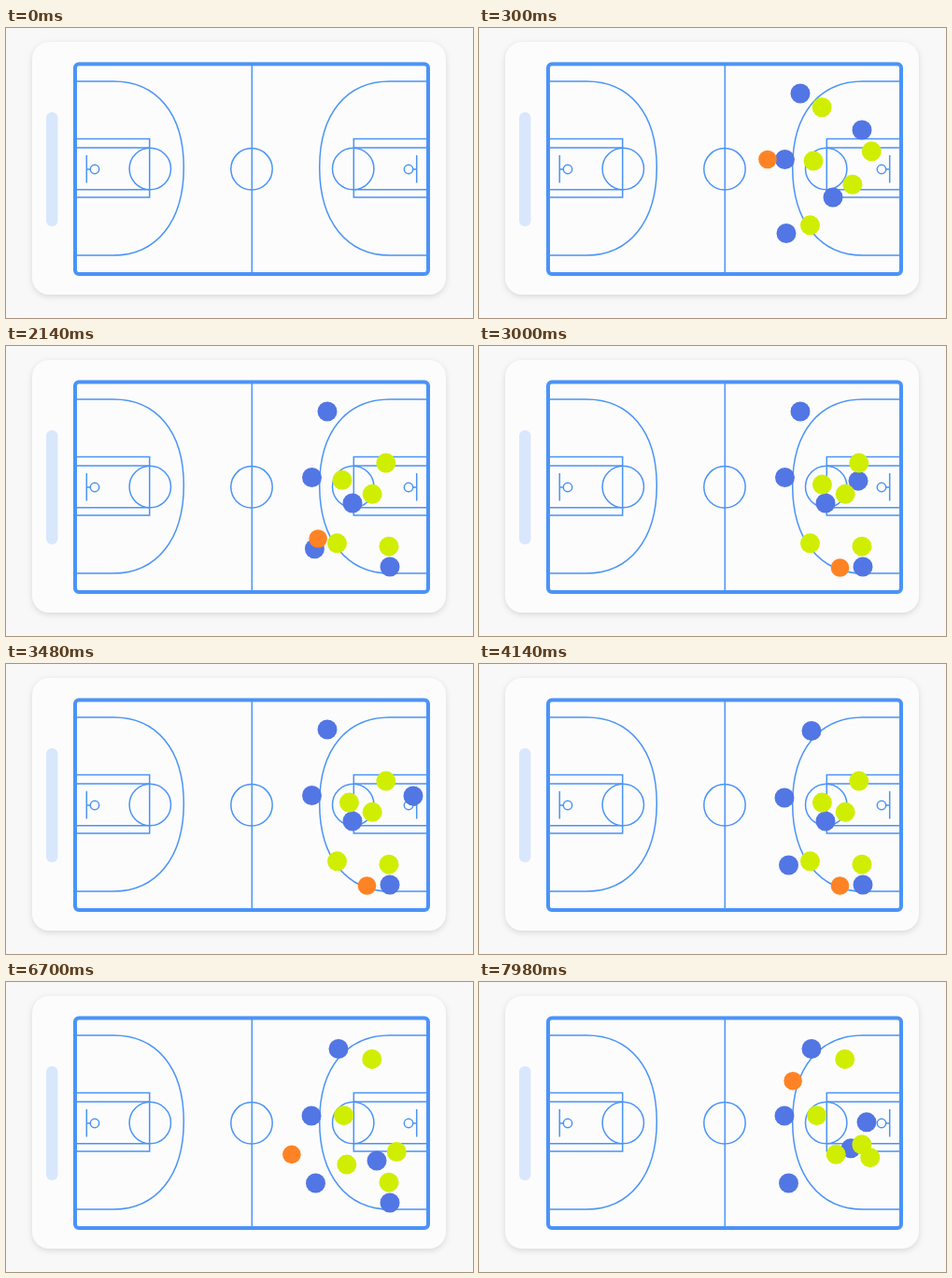
Animation, 500 px wide and 310 px high, one loop 8000 ms. Source, as an HTML page:

```html
<!DOCTYPE html>
<html lang="en">
<head>
<meta charset="utf-8">
<title>Basketball play</title>
<style>
  html, body { margin: 0; width: 100%; height: 100%; overflow: hidden; background: #f8f8f8; }
  svg { display: block; width: 500px; height: 310px; }
  .card { fill: #fcfcfc; filter: drop-shadow(0 2px 3px rgba(0, 0, 0, .13)); }
  .lines { fill: none; stroke: #4a93f8; stroke-width: 1.5; }
</style>
</head>
<body>
<svg viewBox="0 0 500 310">
  <defs>
    <g id="half">
      <path d="M76 57H115C161 57 190.300 91 190.300 149S161 243 115 243H76"/>
      <path d="M76 118.500H153.700V181H76M76 128H153.700M76 172.700H153.700"/>
      <circle cx="154.300" cy="150.500" r="22.200"/>
      <path d="M86.300 136V165.500M86.300 151H90.300"/>
      <circle cx="95" cy="151" r="4.700"/>
    </g>
  </defs>
  <rect width="500" height="310" fill="#f8f8f8"/>
  <rect class="card" x="28" y="15" width="443" height="270" rx="18"/>
  <rect x="43" y="90" width="12.500" height="122" rx="6" fill="#d9e7fd"/>
  <g class="lines">
    <use href="#half"/>
    <use href="#half" transform="translate(526) scale(-1 1)"/>
    <path d="M263.300 39V263"/>
    <circle cx="263" cy="150.800" r="22.200"/>
    <rect x="74" y="38.500" width="378" height="224.500" rx="4" stroke-width="4"/>
  </g>
  <g id="pieces"></g>
</svg>
<script>
const LOOP = 8000;
const FADE_IN = 300;
const HOOP = [431, 151];

// Spots on the court that the attackers run between
const top1 = [344, 70], top2 = [356, 71.5];
const mid1 = [327.5, 140.5], mid2 = [327, 143];
const low1 = [329, 219.5], low2 = [331.5, 215];
const block = [410, 109], corner = [411, 236], baseline = [416.5, 118];
const elbow = [379, 181], post = [371, 168], screen = [397, 191], seal = [398.5, 173];
const rim = [436, 141], lane = [372, 137];

// A defender stands between an attacker's spot and the hoop, optionally shaded sideways
function guard([x, y], gap, side = 0) {
  const dx = HOOP[0] - x, dy = HOOP[1] - y, length = Math.hypot(dx, dy);
  return [x + (dx * gap - dy * side) / length, y + (dy * gap + dx * side) / length];
}

const lineup = {
  attack: { color: '#5276e4', radius: 10.5, start: {
    top: top1, middle: mid1, cutter: low1, runner: block, big: elbow } },
  defence: { color: '#d0ee02', radius: 10.5, start: {
    onTop: guard(top1, 27, -5), onMiddle: guard(mid1, 30.5, -1.5), onRunner: guard(block, 25, 1),
    onBig: guard(elbow, 25, -1.5), onLow: guard(low1, 26, 7) } },
  ball: { color: '#ff8324', radius: 9.8, start: { ball: [309, 140.5] } }
};

// A target is a point, optionally with a bend and its own end time
const beats = [
  { from: 600, to: 820, move: { ball: [320.5, 198] } },
  { from: 1280, to: 1600, move: {
    runner: corner, big: post,
    onTop: guard(top1, 83.5, -2.5), onRunner: guard(corner, 21, -6), onBig: guard(post, 23, -3.5) } },
  { from: 2020, to: 2420, move: { ball: [386.5, 237], onMiddle: guard(mid1, 40.5, 3.5) } },
  { from: 2020, to: 3480, bend: lane, move: { cutter: rim } },
  { from: 3820, to: 4140, move: { cutter: top2, top: mid2, middle: low2 } },
  { from: 4640, to: 5040, move: {
    ball: [307.5, 220.5], onTop: guard(top2, 34.5), onMiddle: guard(mid2, 21.5, 2) } },
  { from: 5540, to: 6000, move: {
    big: screen, onTop: guard(top2, 32.5, -18.5), onMiddle: guard(mid2, 34.5, -3),
    onBig: guard(screen, 21, 10) } },
  { from: 6480, to: 6940, move: { ball: [304, 143], onLow: guard(low2, 58.5, -7.5) } },
  // The last pass is still in the air when the loop restarts
  { from: 7680, to: 8140, move: {
    ball: [348, 92], runner: baseline, big: seal,
    onRunner: guard(baseline, 57, 19), onBig: guard(seal, 8, 3), onLow: guard(low2, 59.5, 5) } }
];

const clamp = v => Math.min(1, Math.max(0, v));
const ease = u => (1 - Math.cos(Math.PI * clamp(u))) / 2;
const layer = document.getElementById('pieces');

const pieces = Object.values(lineup).flatMap(({ color, radius, start }) =>
  Object.entries(start).map(([name, home]) => {
    const node = document.createElementNS('http://www.w3.org/2000/svg', 'circle');
    node.setAttribute('r', radius);
    node.setAttribute('fill', color);
    layer.appendChild(node);
    return { node, home, route: beats.filter(beat => beat.move[name]).map(beat => ({ ...beat, goal: beat.move[name] })) };
  }));

function position({ home, route }, time) {
  return route.reduce((here, { from, to, bend, goal }) => {
    const e = ease((time - from) / (to - from));
    return here.map((a, axis) => {
      const c = goal[axis], b = bend ? bend[axis] : (a + c) / 2;
      return (1 - e) ** 2 * a + 2 * e * (1 - e) * b + e * e * c;
    });
  }, home);
}

function render(time) {
  for (const piece of pieces) {
    const [x, y] = position(piece, time);
    piece.node.setAttribute('cx', x);
    piece.node.setAttribute('cy', y);
    piece.node.setAttribute('opacity', clamp(time / FADE_IN));
  }
}

let origin;
function tick(now) {
  origin ??= now;
  render((now - origin) % LOOP);
  requestAnimationFrame(tick);
}
render(0);
requestAnimationFrame(tick);
</script>
</body>
</html>
```
